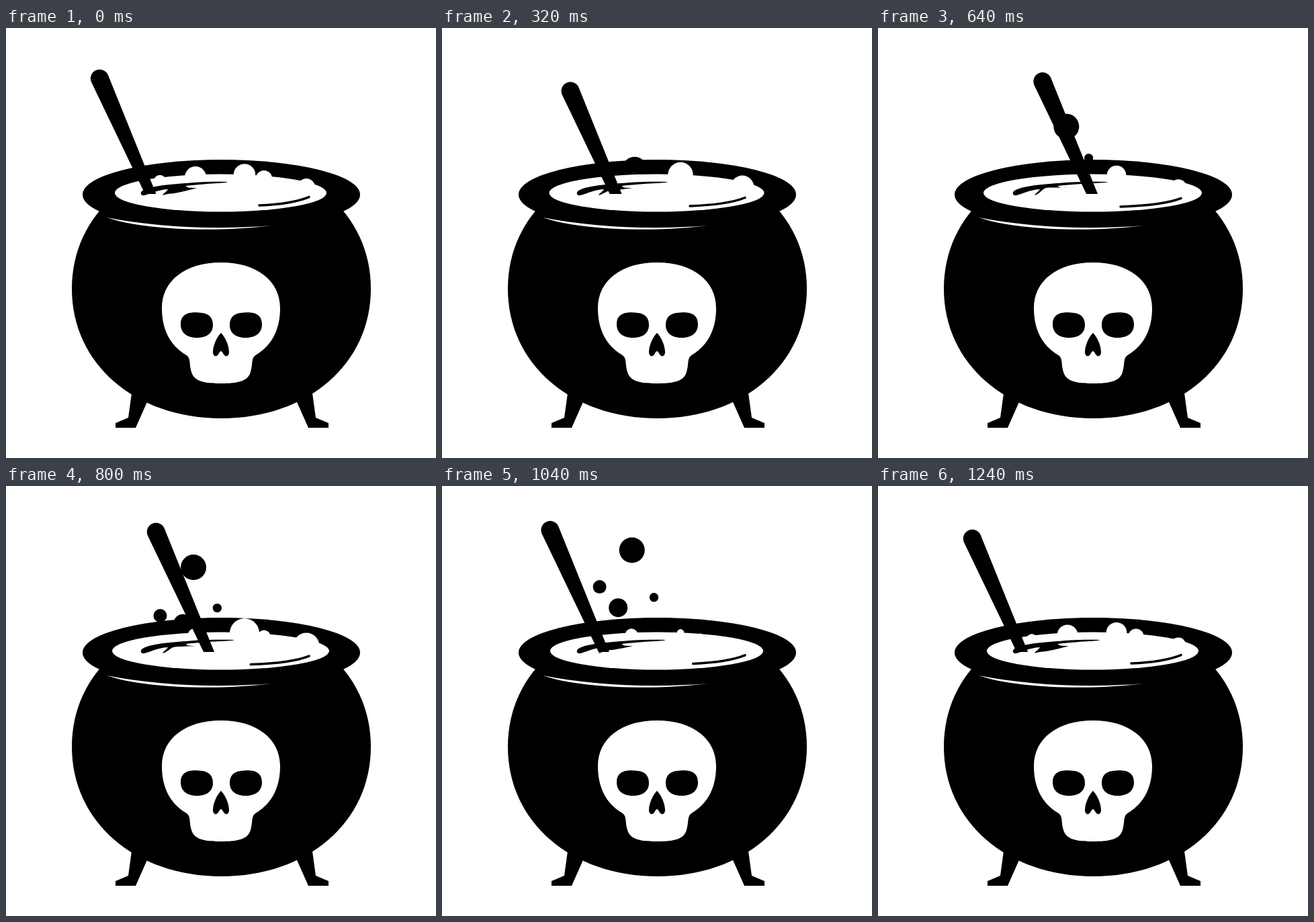
Write an HTML page with a canvas that moves like this. It is 640 px wide and 640 px high and loops after 1.28 s.

```html
<!DOCTYPE html>
<html lang="en">
<head>
<meta charset="utf-8">
<title>Cauldron</title>
<style>
  html, body { margin: 0; width: 100%; height: 100%; overflow: hidden; background: #fff; }
  canvas { display: block; width: 100vmin; height: 100vmin; }
</style>
</head>
<body>
<canvas id="stage" width="640" height="640"></canvas>
<script>
const ctx = document.getElementById('stage').getContext('2d');
const LOOP = 1280, STEP = 40, STIR = 1200, BURST = 80;

// Right halves; mirrored() adds the left ones
const body = new Path2D('M320 196C449 196 543 276 543 388C543 500 449 581 320 581Z');
const leg = new Path2D('M455.5 540L461 580L480 588V595H450L430 550Z');
const skull = new Path2D('M319 349H320C373 349 408 376 408 417C408 448 396 472 373 486C364 491 368 499 364 512C360 526 345 529 320 529H319Z');
const eye = new Path2D('M350 424C366 422 381 424 381 441C381 455 370 461 357 461C342 461 333 454 333 442C333 431 339 425 350 424Z');
const nose = new Path2D('M319.5 454H320C326 459 332 473 332 482C332 488 328 490 325 487C323 485 322 481 320 481H319.5Z');
const glint = new Path2D('M150 282C200 300 310 305 396 294C310 301 220 296 150 282Z');
const spoon = new Path2D('M12.4 -5.4L95.4 200H81L-12.4 5.4A13.5 13.5 0 0 1 12.4 -5.4Z');

const domes = [
  { x: 229, y: 228, size: 14, start: 1120, life: 360 },
  { x: 282, y: 222, size: 17.5, start: 920, life: 560 },
  { x: 281, y: 222, size: 14, start: 600, life: 260 },
  { x: 355, y: 218.5, size: 19, start: 990, life: 610 },
  { x: 355, y: 219, size: 26, start: 520, life: 340 },
  { x: 384, y: 224, size: 14, start: 980, life: 500 },
  { x: 384, y: 224, size: 13, start: 600, life: 260 },
  { x: 447, y: 237, size: 18, start: 1090, life: 510 },
  { x: 447, y: 238, size: 23, start: 520, life: 340 }
];

const bubbles = [
  { x: 283, y: 226, size: 19, start: 250, rise: 138, drift: 4 },
  { x: 232.5, y: 216, size: 10, start: 680, rise: 123, drift: -4 },
  { x: 314.5, y: 200, size: 6.7, start: 560, rise: 50, drift: -1 },
  { x: 262.5, y: 213, size: 14, start: 720, rise: 66, drift: 1 }
];

function oval(x, y, rx, ry, color) {
  ctx.fillStyle = color;
  ctx.beginPath();
  ctx.ellipse(x, y, rx, ry, 0, 0, 7);
  ctx.fill();
}

function fill(path, color) {
  ctx.fillStyle = color;
  ctx.fill(path);
}

function mirrored(path, color, axis) {
  fill(path, color);
  ctx.save();
  ctx.translate(2 * axis, 0);
  ctx.scale(-1, 1);
  fill(path, color);
  ctx.restore();
}

// Falls from 1 to 0 during the burst that ends a life
const fade = left => Math.max(0, Math.min(1, left / BURST));

function drawBubbles(t) {
  for (const { x, y, size, start, rise, drift } of bubbles) {
    const age = t - start;
    if (age < 0) continue;
    const r = size * fade(1160 - t);
    oval(x + drift * Math.cos(age / 170), y - rise * Math.sin(age / 1000 * Math.PI / 2), r, r, '#000');
  }
}

function drawPot() {
  mirrored(leg, '#000', 321.5);
  mirrored(body, '#000', 320.5);
  oval(320.5, 248, 206.5, 52, '#000');
  fill(glint, '#fff');
  mirrored(skull, '#fff', 320);
  mirrored(eye, '#000', 320.5);
  mirrored(nose, '#000', 320);
}

function drawFoam(t) {
  for (const { x, y, size, start, life } of domes) {
    const age = (t - start + LOOP) % LOOP;
    const r = size * (1 - Math.exp(-age / 150)) * fade(life + BURST - age);
    oval(x, y, r, r, '#fff');
  }
}

function drawBrew(t, sway) {
  oval(319.5, 245.5, 160 - 2.5 * sway, 28, '#fff');
  drawFoam(t);
  const tip = 336 - 6 * sway, low = 242 + 4 * sway;
  fill(new Path2D(`M201 245C202 239 225 234 255 232C285 229 310 228 ${tip} 229
    C${tip} 231 300 231 268 235C268 238 276 238 284 238C270 ${240 + 2 * sway} 258 ${low - 1} 250 ${low}
    C245 ${low + 1} 242 246 233 249C235 245 240 243 241 240
    C225 241 218 246 206 249C202 250 200 247 201 245Z`), '#000');
  ctx.lineWidth = 3.5;
  ctx.lineCap = 'round';
  ctx.beginPath();
  ctx.moveTo(369 + 8 * sway, 265 - sway);
  ctx.quadraticCurveTo(425, 263 - sway, 451, 252.5 - sway);
  ctx.stroke();
}

function drawSpoon(angle) {
  ctx.save();
  ctx.beginPath();
  ctx.rect(0, 0, 640, 247);
  ctx.clip();
  ctx.translate(192.6 - 53 * Math.cos(angle) + 1.5 * Math.sin(3 * angle), 79 + 15 * Math.sin(angle - 0.15));
  fill(spoon, '#000');
  ctx.restore();
}

function frame() {
  const t = Math.floor(performance.now() % LOOP / STEP) * STEP;
  const angle = 2 * Math.PI * (t - 20) / STIR;
  ctx.clearRect(0, 0, 640, 640);
  drawBubbles(t);
  drawPot();
  drawBrew(t, Math.cos(angle));
  drawSpoon(angle);
  requestAnimationFrame(frame);
}
frame();
</script>
</body>
</html>
```
